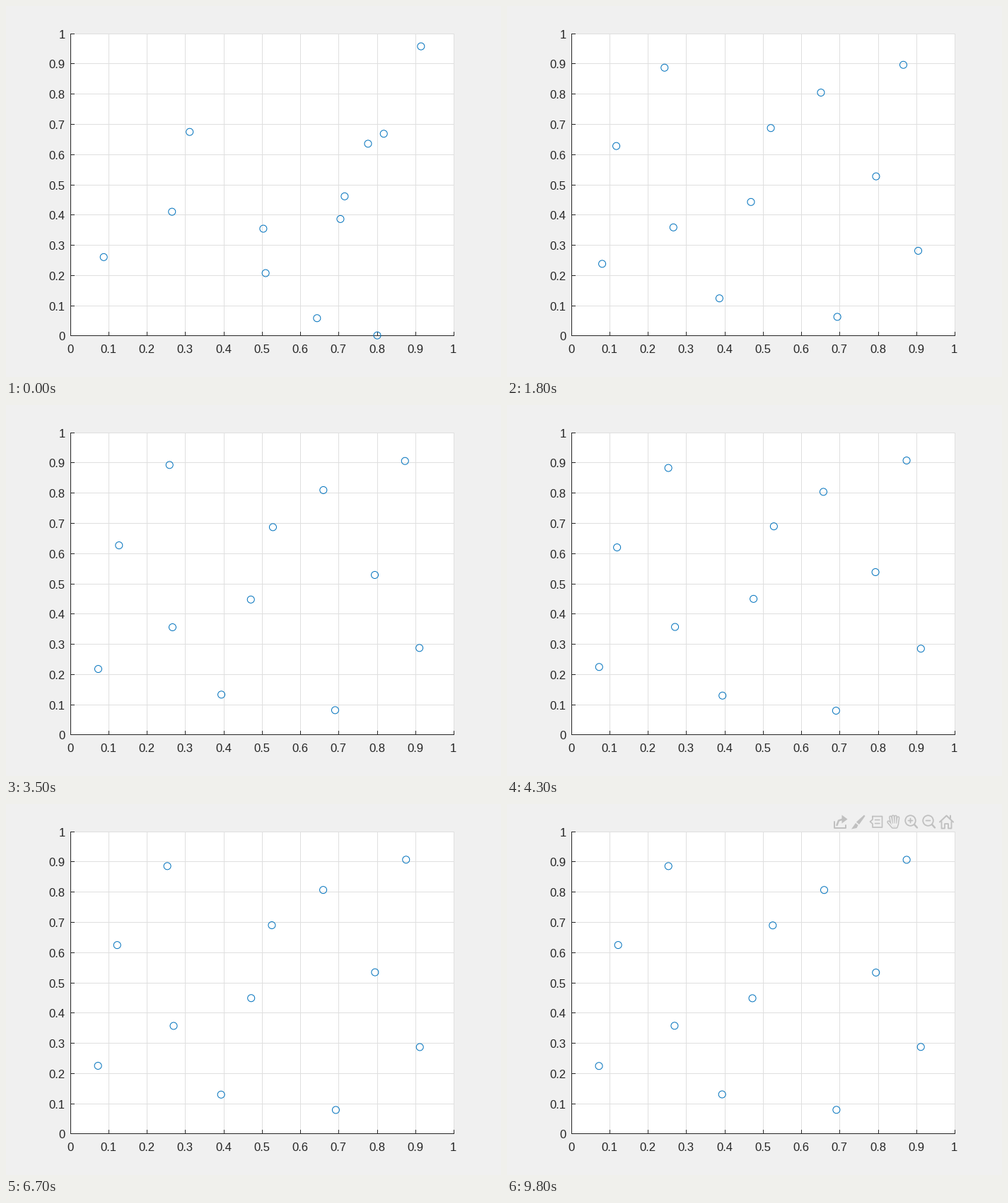
Recreate the animation shown at these times as a matplotlib script. Size 700x525 px, loop 10 s.

```python
import numpy as np
import matplotlib.pyplot as plt
from matplotlib.animation import FuncAnimation
from matplotlib.patches import Circle, Polygon, Rectangle

W, H, DPI = 700, 525, 100
FRAMES, INTERVAL = 100, 100
PX = 72 / DPI
BACK, INK, GRID, BLUE, ICON = "#f0f0f0", "#262626", "#dfdfdf", "#0072bd", "#c0c0c0"
LEFT, BOTTOM, WIDTH, HEIGHT = 91, 467.0, 542.5, 427.875

DECAY, JOSTLE = 0.95, 0.017
SPREAD_END, SETTLED, TOOLBAR_FROM = 11, 95, 98

# Where the dots are dropped, and where each comes to rest, in axis units.
START = np.array([(.087, .261), (.265, .411), (.311, .675), (.503, .355),
                  (.509, .208), (.704, .387), (.776, .636), (.817, .669),
                  (.643, .059), (.715, .462), (.914, .958), (.800, .002)])
REST = np.array([(.072, .225), (.122, .625), (.253, .886), (.269, .358),
                 (.393, .131), (.472, .449), (.525, .690), (.659, .807),
                 (.691, .080), (.794, .534), (.874, .907), (.911, .288)])


def to_pixels(points):
    return points * [WIDTH, -HEIGHT] + [LEFT, BOTTOM]


def build_paths():
    """Dots spread out in shrinking steps, then jostle ever less around their rest."""
    step = np.minimum(np.arange(FRAMES), SETTLED)
    glide = np.minimum((1 - DECAY ** step) / (1 - DECAY ** SPREAD_END), 1)
    shake = JOSTLE * DECAY ** step * (step > 0) * (step < SETTLED)
    noise = np.random.default_rng(4).normal(size=(FRAMES, *START.shape))
    points = START + (REST - START) * glide[:, None, None] + noise * shake[:, None, None]
    return to_pixels(np.clip(points, 0, 0.96))


fig = plt.figure(figsize=(W / DPI, H / DPI), dpi=DPI, facecolor=BACK)
ax = fig.add_axes([0, 0, 1, 1])
ax.set_xlim(0, W)
ax.set_ylim(H, 0)
ax.axis("off")


def line(points, color=INK, width=1, **style):
    xs, ys = zip(*points)
    return ax.plot(xs, ys, color=color, lw=width * PX, snap=False, **style)[0]


def draw_chart():
    # Lines sit on pixel centres so that they stay crisp.
    xs = np.floor(LEFT + WIDTH * np.arange(11) / 10) + 0.5
    ys = np.floor(BOTTOM - 0.05 - HEIGHT * np.arange(11) / 10) + 0.5
    left, right, bottom, top = xs[0], xs[-1], ys[0], ys[-1]
    ax.add_patch(Rectangle((left - 0.5, top - 0.5), right - left + 1, bottom - top + 1,
                           fc="white", ec="none", snap=False))
    flat = dict(solid_capstyle="butt")
    for x, y in zip(xs[1:], ys[1:]):
        line([(x, top - 0.5), (x, bottom)], GRID, **flat)
        line([(left, y), (right + 0.5, y)], GRID, **flat)
    line([(left, top - 0.5), (left, bottom + 0.5)], **flat)
    line([(left - 0.5, bottom), (right + 0.5, bottom)], **flat)
    font = dict(family="Liberation Sans", size=16.67 * PX, color=INK, va="baseline")
    for i, (x, y) in enumerate(zip(xs, ys)):
        line([(x, bottom), (x, bottom - 5.5)], **flat)
        line([(left, y), (left + 5.5, y)], **flat)
        label = f"{i / 10:g}"
        ax.text(x - 0.7, 491, label, ha="center", **font)
        ax.text(83.5, y + 6.5, label, ha="right", **font)


def draw_toolbar():
    parts = []

    def stroke(points, width=2, color=ICON):
        parts.append(line(points, color, width, solid_joinstyle="round",
                          solid_capstyle="round"))

    def fill(points):
        parts.append(ax.add_patch(Polygon(points, fc=ICON, ec="none")))

    # Export
    stroke([(463, 25), (463, 34), (479, 34), (479, 30)])
    stroke([(466.5, 30), (469, 23.5), (475, 21.5)], 2.5)
    fill([(473.5, 15.5), (481.5, 21.5), (473.5, 27.5)])
    # Brush
    fill([(505, 15.5), (506.5, 17), (498, 29), (494, 25.5)])
    fill([(493, 27), (496.5, 30), (494.5, 34), (487, 35.5)])
    # Data tip
    stroke([(517, 17.5), (530.5, 17.5), (530.5, 33), (517, 33), (517, 28),
            (513.5, 25), (517, 22), (517, 17.5)], 1.7)
    for y in (22.5, 27.5):
        stroke([(520.5, y), (527, y)], 1.6)
    # Hand: wide strokes hollowed out by narrow ones
    for color, width in ((ICON, 4.6), (BACK, 1.6)):
        for i in range(4):
            stroke([(542.3 + 3.6 * i, 17.5 + 0.7 * (i - 1.3) ** 2),
                    (544.3 + 2.5 * i, 28)], width, color)
        stroke([(539.5, 25.5), (545.5, 32.5), (550.5, 32.5), (552, 28)], width, color)
    stroke([(546, 29.5), (550, 29.5)], 4, BACK)
    # Magnifiers
    for x in (570.5, 595.5):
        parts.append(ax.add_patch(Circle((x, 23.5), 7.3, fc="none", ec=ICON, lw=1.8 * PX)))
        stroke([(x + 5.5, 29), (x + 9.5, 33.5)], 2.4)
        stroke([(x - 3, 23.5), (x + 3, 23.5)], 1.8)
    stroke([(570.5, 20.5), (570.5, 26.5)], 1.8)
    # Home
    stroke([(612, 25.5), (621.5, 16.5), (631, 25.5)])
    stroke([(627, 20), (627, 16.5)])
    stroke([(614.5, 25), (614.5, 34.5), (619, 34.5), (619, 28), (624, 28),
            (624, 34.5), (628.5, 34.5), (628.5, 25)], 1.8)
    return parts


draw_chart()
toolbar = draw_toolbar()
paths = build_paths()
dots = [ax.add_patch(Circle(p, 5, fc="none", ec=BLUE, lw=PX, zorder=3)) for p in paths[0]]


def update(frame):
    for dot, position in zip(dots, paths[frame]):
        dot.center = position
    for part in toolbar:
        part.set_visible(frame >= TOOLBAR_FROM)
    return dots + toolbar


anim = FuncAnimation(fig, update, frames=FRAMES, interval=INTERVAL, repeat=True, repeat_delay=0)
plt.show()
```
